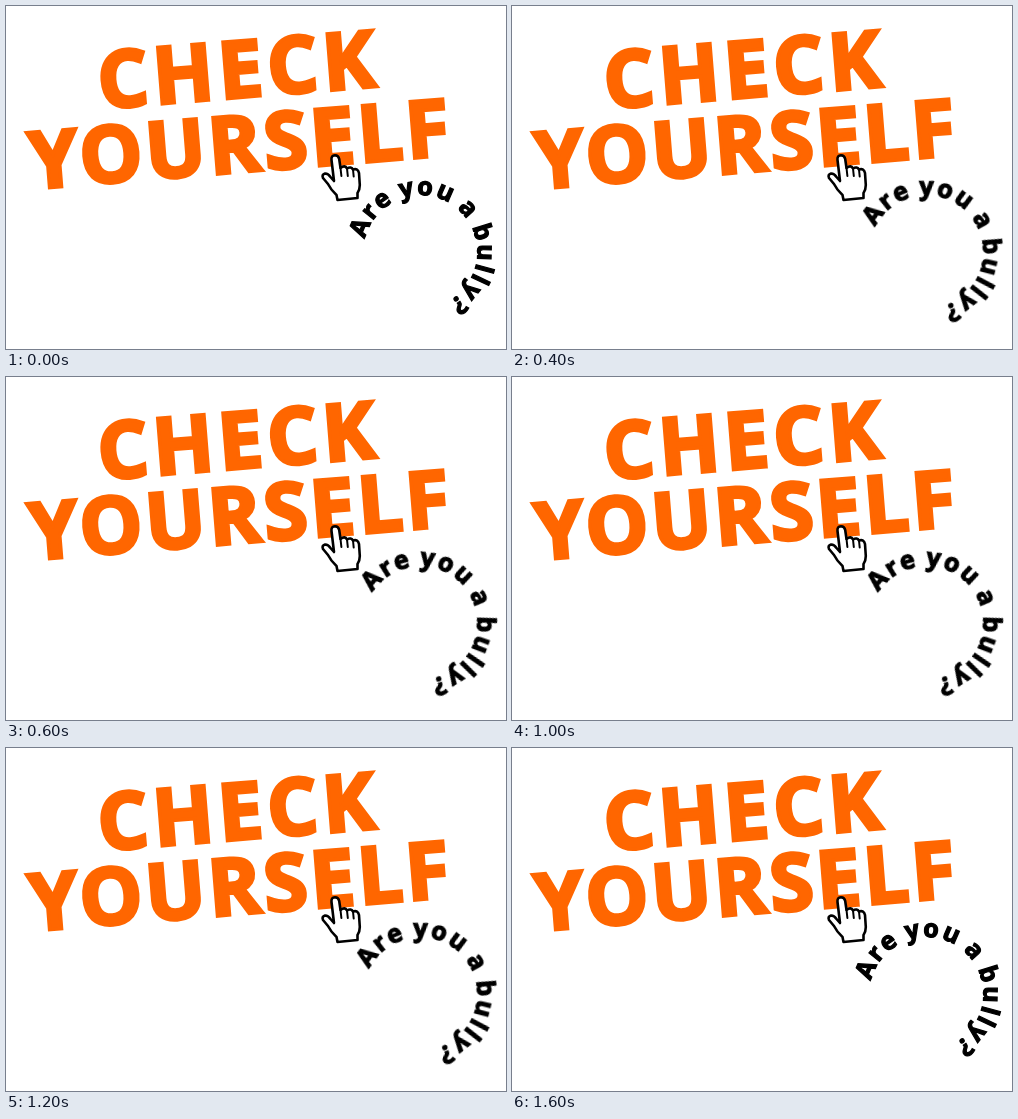
An HTML page for the animation above (1.8 s loop, 500x343 px).

```html
<!DOCTYPE html>
<html lang="en">
<head>
<meta charset="utf-8">
<title>Check yourself</title>
<style>
  html, body { margin: 0; width: 100%; height: 100%; overflow: hidden; background: #fff; }
  svg { display: block; width: 500px; height: 343px; }
  .title { font: 700 79px "Open Sans", "Noto Sans", sans-serif; fill: #ff6600; stroke: #ff6600; stroke-width: 3.6; }
  .top { letter-spacing: 5px; }
  .bottom { letter-spacing: 3.3px; }
  .ring { font: 700 25px "Noto Sans", "Open Sans", sans-serif; letter-spacing: 2.2px; word-spacing: -2px; stroke: #000; stroke-width: 1.2; }
  .hand { fill: #fff; stroke: #000; stroke-width: 2.6; stroke-linejoin: round; stroke-linecap: round; }

  /* Five held poses out, four back. */
  .swing { --step: 6.4deg; animation: swing 1800ms infinite; }
  @keyframes swing {
    0% { transform: rotate(0deg); animation-timing-function: steps(5, jump-none); }
    55.555% { transform: rotate(calc(4 * var(--step))); animation-timing-function: step-start; }
    55.556% { transform: rotate(calc(3 * var(--step))); animation-timing-function: steps(4, jump-none); }
    100% { transform: rotate(0deg); }
  }
</style>
</head>
<body>
<svg viewBox="0 0 500 343">
  <defs>
    <path id="arc" d="M0 57a57 57 0 0 1 0-114a57 57 0 0 1 0 114"/>
  </defs>

  <g class="title">
    <text class="top" transform="translate(94 102.7) rotate(-4.6)">CHECK</text>
    <text class="bottom" transform="translate(25 182.9) rotate(-4.6)">YOURSELF</text>
  </g>

  <g class="hand">
    <path d="M328 175L325.5 154Q325 149.500 329 149.300Q332.500 149.300 333.200 153L334.500 162Q339 158.500 341 162.500Q345 160 347 163.500Q352 162 353 167L353.800 179Q353.800 184 351.500 187L351.500 192L331.500 194L330.500 189Q325 184 322 178L317 172Q315.500 168.500 319 167.500Q322 167.300 324.500 171Z"/>
    <path d="M334.500 162l.9 8M341 162.500l.8 7.500M347 163.500l.7 7" fill="none" stroke-width="2"/>
  </g>

  <g transform="translate(414.5 246)">
    <g class="swing">
      <text class="ring"><textPath href="#arc" startOffset="102.500">Are you a bully?</textPath></text>
    </g>
  </g>
</svg>
</body>
</html>
```
